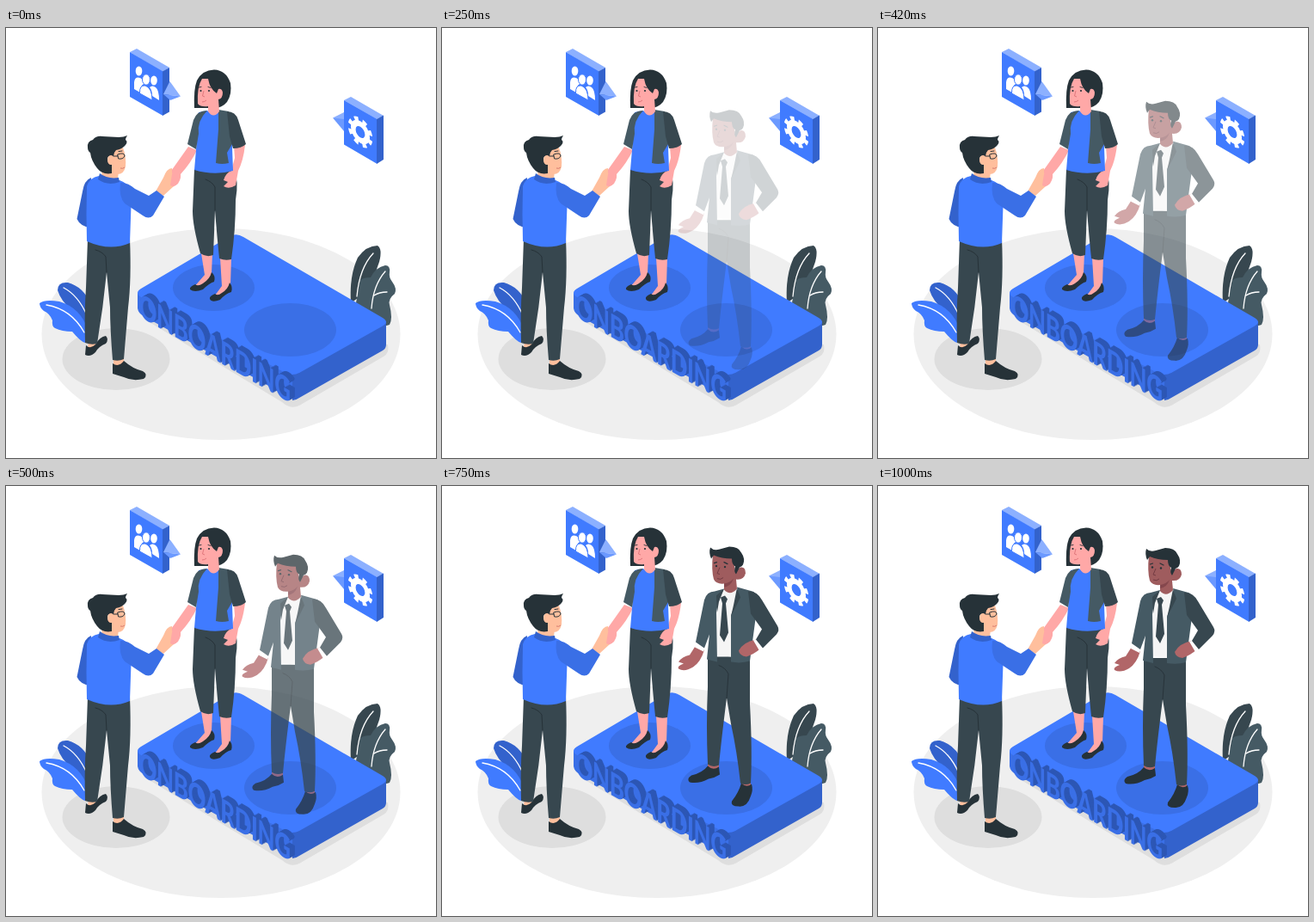
An HTML page that plays this animation: 500x500 px, repeating every 1040 ms.

```html
<!DOCTYPE html>
<html lang="en">
<head>
<meta charset="utf-8">
<title>Onboarding</title>
<style>
  html, body { margin: 0; width: 100%; height: 100%; overflow: hidden; background: #fff; }
  svg { display: block; width: 100%; height: 100%; }
  .blue { fill: #407bff; }
  .mid { fill: #3a6fe6; }
  .deep { fill: #3362cc; }
  .dark { fill: #2d57b5; }
  .pale { fill: #8cb0ff; }
  .soft { fill: #6b99ff; }
  .ink { fill: #263238; }
  .slate { fill: #37474f; }
  .coat { fill: #455a64; }
  .white { fill: #fff; }
  .rose { fill: #ffa8a7; }
  .peach { fill: #ffbf9d; }
  .brown { fill: #b16668; }
  .line { fill: none; stroke: #263238; stroke-linecap: round; }
  .vein { fill: none; stroke: #fff; stroke-width: 1.3; stroke-linecap: round; }
  #sign text { font: 800 38px Lato, "Open Sans", sans-serif; letter-spacing: -.5px; }
</style>
</head>
<body>
<svg viewBox="0 0 500 500">
  <!-- Floor -->
  <ellipse cx="250" cy="356" rx="208.500" ry="123" fill="#efefef"/>
  <ellipse cx="128" cy="385" rx="62.500" ry="36" fill="#dedede"/>
  <path fill="#dedede" d="M160 338L321 435Q331 444 341 439L439 382Q446 378 444 368Z"/>

  <!-- Plants -->
  <g>
    <path class="deep" d="M60 305Q60 295 72 296Q90 301 98 320L93 352Q80 344 76 327Q64 318 60 305Z"/>
    <path class="blue" d="M39 320Q45 315 62 318Q86 325 95 350L92 366Q87 365 77 353Q65 353 57 349Q53 347 54 340Q51 332 44 329Q39 325 39 320Z"/>
    <path class="vein" d="M67 302Q84 311 94 334M47 322Q76 327 91 354"/>
    <path class="slate" d="M401 320Q399 288 409 267Q419 253 432 253Q438 257 434 272Q429 288 421 305Z"/>
    <path class="coat" d="M406 324Q411 300 412 293Q416 290 424 290Q430 278 441 276Q447 276 446 284Q445 290 449 295Q455 303 452 309Q444 315 446 322Q450 338 446 345L436 348Z"/>
    <path class="vein" d="M427 262Q411 279 408 312M441 283Q427 299 425 326M428 311Q434 307 443 307"/>
  </g>

  <!-- Platform -->
  <path class="mid" d="M153 308V326Q154 332 160 335L325 427L334 432V402Z"/>
  <path class="deep" d="M333 402V433Q337 433 341 430L438 375Q442 373 442 368V341Z"/>
  <path class="blue" d="M157 303L258 243.500Q267 237.500 276 243L438 337Q446 342 438 346.500L341 401Q333 405 325 401L157 313Q149 308 157 303Z"/>
  <ellipse class="mid" cx="241.500" cy="302" rx="47.500" ry="27"/>
  <ellipse class="mid" cx="330.500" cy="351" rx="53.500" ry="31"/>
  <g id="sign"></g>

  <!-- Bubble with a team -->
  <path class="pale" d="M144 28L152 24L190 46L182 51Z"/>
  <path class="blue" d="M144 28L182.500 50.500V102L144 80Z"/>
  <path class="deep" d="M182 50.500L190 46V97.500L182 102Z"/>
  <path class="pale" d="M190.500 62L203 79.500L183 77Z"/>
  <path class="soft" d="M183 77L203 79.500L191 84Z"/>
  <g class="white">
    <ellipse cx="154.500" cy="50" rx="3.800" ry="5.500"/>
    <ellipse cx="172" cy="61" rx="3.800" ry="5.500"/>
    <path d="M149 71V63Q150 56 156 58Q160 60 160 65Q156 67 156 75Z"/>
    <path d="M167 69Q170 66 174 69Q178 72 178 84L170 79Q170 72 167 69Z"/>
    <g stroke="#407bff">
      <ellipse cx="163" cy="60" rx="4.500" ry="6.200"/>
      <path d="M155.500 76Q155 66 162 67Q170 70 170 84Z"/>
    </g>
  </g>

  <!-- Bubble with a cog -->
  <path class="pale" d="M393 84L401 80L439 102L431 106Z"/>
  <path class="blue" d="M393 84L431.500 106V158L393 135.500Z"/>
  <path class="deep" d="M431 106L439 101.500V153L431 158Z"/>
  <path class="pale" d="M380 104.500L393 98V108Z"/>
  <path class="soft" d="M380 104.500L393 106V120Z"/>
  <g transform="matrix(.866 .5 0 1 412 121)" fill="none" stroke="#fff">
    <circle r="9.500" stroke-width="6.500"/>
    <circle r="14" stroke-width="5" stroke-dasharray="5.498" transform="rotate(10)"/>
  </g>

  <!-- Woman -->
  <g>
    <path class="rose" d="M227 262H240L239 285Q238 293 227 300L218 302L231 287ZM249 267H262L261 298Q259 306 249 313L240 315L251 300Z"/>
    <path class="ink" d="M239 284Q244 288 242 295Q236 297 229 304Q219 308 214 304Q213 301 220 298Q223 301 229 297Q237 292 239 284ZM260 296Q264 301 262 307Q255 309 249 316Q239 320 237 315Q236 312 243 309Q246 312 251 308Q258 304 260 296Z"/>
    <path class="slate" d="M219 164Q242 172 265 163Q271 178 267 200Q267 235 262 269Q255 271 248 268Q245 238 243 212L241 264Q233 267 226 262Q217 230 217 213Z"/>
    <path class="line" stroke-width="1" d="M243 212L243 185Q240 179 232 176"/>
    <path class="rose" d="M212 138L222 142Q215 157 203 170Q201 183 193 185L187 177Q190 168 195 162Z"/>
    <path class="rose" d="M265 138L278 136Q276 154 270 166L267 183Q259 188 253 184L258 179L253 177Q255 169 262 166L266 151Z"/>
    <path class="blue" d="M224 98L234 96Q241 103 248 96L262 110L264 166Q242 172 219 165L222 130Z"/>
    <path class="coat" d="M234 96Q222 96 218 107L211 135L221 141L224 123Q222 108 234 96Z"/>
    <path class="coat" d="M247 95L259 97L266 130L257 145L259 157Q251 159 244 157L247 118Z"/>
    <path class="slate" d="M257 97Q267 97 270 107L279 135Q274 140 264 140L260 126Z"/>
    <path class="ink" d="M219 93Q218 71 222 61Q228 49 242 48.500Q256 49 261 64Q263 77 257 86Q252 92 244 93Z"/>
    <path class="rose" d="M228 59Q222 68 223 88Q226 92 235 91L235 97Q241 106 248 97L247 83Q252 82 252 75Q251 70 247 71L245 76Q237 71 235 59Z"/>
    <g class="ink"><circle cx="226.500" cy="73" r="1.100"/><circle cx="236" cy="73" r="1.100"/></g>
    <path class="line" stroke-width=".9" d="M224.500 69L227 68.500M235 68.500L238 69.500"/>
    <path fill="none" stroke="#e0777c" stroke-width="1" d="M230 73L228.500 79L231 80M228 86Q231 86 233 84"/>
  </g>

  <!-- Newcomer -->
  <g id="newcomer">
    <path class="brown" d="M309 323H322V334H309ZM348 344H359V356H348Z"/>
    <path class="ink" d="M309 327Q315 333 322 328L323 337Q317 341 310 342Q299 348 288 346Q284 342 290 338Q303 335 309 327ZM348 347Q354 353 360 348Q362 355 359 362Q355 375 345 374Q335 374 337 368Q345 358 348 347Z"/>
    <path class="slate" d="M309 200H358L358 255Q361 310 359 347Q353 350 347 347Q343 310 336 278L331 248Q325 295 322 326Q315 329 309 325Q307 280 309 235Z"/>
    <path class="line" stroke-width=".9" d="M331 248L333 220Q330 213 322 210"/>
    <path class="brown" d="M295 187L305 192Q301 206 292 212Q282 218 275 214Q273 211 281 208L275 206Q279 200 288 198Z"/>
    <path class="white" d="M295 183L306 189L304 194L294 189Z"/>
    <path fill="#f5f5f5" d="M318 126L329 121H343L347 130L337 200L319 198Z"/>
    <path class="slate" d="M324 131L329 129L332 133L330 138L333 172L328 183L323 175L326 138Z"/>
    <path class="coat" d="M328 121L317 124Q308 124 305 134L295 183L305 190L311 174L308 203L320 206L319 149L322 130Z"/>
    <path class="coat" d="M343 119L361 124Q368 126 366 145L358 205Q348 208 336 206L336 152L345 129Z"/>
    <path class="slate" d="M328 121L319 129L320 148L322 136ZM343 120L347 131L336 153L339 140Z"/>
    <path class="brown" d="M365 180L371 190Q363 197 354 200Q346 199 345 193Q350 183 365 180Z"/>
    <path class="white" d="M362 181L367 179L373 189L369 193Z"/>
    <path class="slate" d="M356 124Q366 123 372 134L390 164Q393 169 389 174L373 190L365 180L372 168L359 150Z"/>
    <path fill="#9f5c5e" d="M315 81Q313 99 316 110Q319 116 328 115V122Q335 130 343 121L342 110Q351 111 353 103Q353 95 347 96L341 100L338 83Z"/>
    <path fill="#85474d" d="M328 115Q335 114 339 109Q336 118 328 119Z"/>
    <path class="ink" d="M313 86Q310 79 312 73Q316 77 323 75L334 72Q345 72 348 79Q353 86 350 93Q349 95 346 96L342 104Q339 101 341 95Q337 93 337 86Q325 86 316 82Z"/>
    <g class="ink"><circle cx="319" cy="94.500" r="1.200"/><circle cx="329" cy="95.500" r="1.200"/></g>
    <path class="line" stroke-width="1.200" d="M316.500 91L319.500 90M328 90L332 92"/>
    <path fill="none" stroke="#733b43" stroke-width="1" d="M323 96L320 103L323 104M320 109Q324 111 327 108"/>
  </g>

  <!-- Host -->
  <g>
    <path class="peach" d="M96 362H106V373H95ZM125 382H137V395H125Z"/>
    <path class="ink" d="M93 369Q98 374 104 368Q109 359 116 358Q120 362 116 367Q108 370 104 377Q98 383 92 380ZM124 390Q131 395 137 387Q147 396 159 399Q166 403 160 408Q147 411 137 406L124 402Z"/>
    <path class="slate" d="M95 245H144Q146 292 142 325L137 385Q131 388 124 386Q121 350 121 325L117 284Q113 325 106 367Q99 369 92 366Q91 330 93 302Z"/>
    <path class="line" stroke-width="1" d="M117 284L116 266Q112 260 104 258"/>
    <path class="deep" d="M99 174Q91 177 89 190L82.500 222Q86 230 97 232Z"/>
    <path class="peach" d="M174 190L183 174Q187 163 193 163L193 168Q196 176 195 184L183 195Z"/>
    <path class="rose" d="M193 170Q197 165 202 168Q205 173 200 181Q195 186 191 183Z"/>
    <path class="blue" d="M108 172Q120 181 132 177Q144 181 146 192L144 250Q121 260 94 248Q93 215 94 184Q97 174 108 172Z"/>
    <path class="mid" d="M133 180Q141 179 150 187L166 195L175 189L184 196L171 218Q166 223 159 218L138 204Q131 196 133 180Z"/>
    <path class="peach" d="M112 163L131 166L130 176Q119 180 111 172Z"/>
    <path class="deep" d="M109 169Q118 176 131 174L132 179Q118 184 107 176Z"/>
    <path class="peach" d="M121 143L136 139Q140 150 139 161Q137 171 128 170L119 168Z"/>
    <path class="ink" d="M95 139Q94 132 101 130Q105 125 112 126L131 127Q137 127 141 125Q139 128 139 130Q142 132 139 136Q135 141 128 142Q125 145 125 149Q118 147 118 153Q119 158 123 159L123 169Q112 171 106 163Q99 154 98 145Q95 143 95 139Z"/>
    <ellipse class="peach" cx="122" cy="153.500" rx="4" ry="5.500"/>
    <path class="line" stroke-width="1" d="M125 149L130 149M130 147Q138 144 138 149Q136 153 131 152ZM131 143.500L135 143"/>
    <path fill="none" stroke="#d77c70" stroke-width="1" d="M133 163Q136 164 138 162"/>
  </g>
</svg>
<script>
  const LOOP = 1040, FPS = 24, RISE = 30;
  const sign = document.getElementById("sign");
  const newcomer = document.getElementById("newcomer");

  // Raised lettering: stacked layers pushed out of the platform's side
  const DEPTH = 7;
  for (let i = DEPTH; i >= 0; i--) {
    const x = 154.5 + i * .87, y = 335 - i * .5;
    const cls = i ? "dark" : "mid";
    sign.innerHTML += `<text class="${cls}" transform="matrix(.68 .39 0 1 ${x} ${y})">ONBOARDING</text>`;
  }

  const bezier = (a, b, s) => 3 * (1 - s) ** 2 * s * a + 3 * (1 - s) * s * s * b + s ** 3;

  // Ease with a slight overshoot near the end
  function ease(p) {
    let lo = 0, hi = 1;
    for (let i = 0; i < 24; i++) {
      const s = (lo + hi) / 2;
      if (bezier(.36, .5, s) < p) lo = s; else hi = s;
    }
    return bezier(-.01, 1.38, hi);
  }

  function draw(now) {
    const t = now % LOOP;
    const step = Math.min(FPS, Math.floor((t + 5) / 1000 * FPS));
    const k = ease(step / FPS);
    newcomer.setAttribute("opacity", Math.max(0, Math.min(1, k)));
    newcomer.setAttribute("transform", `translate(0 ${RISE * (1 - k)})`);
    requestAnimationFrame(draw);
  }
  draw(0);
</script>
</body>
</html>
```
